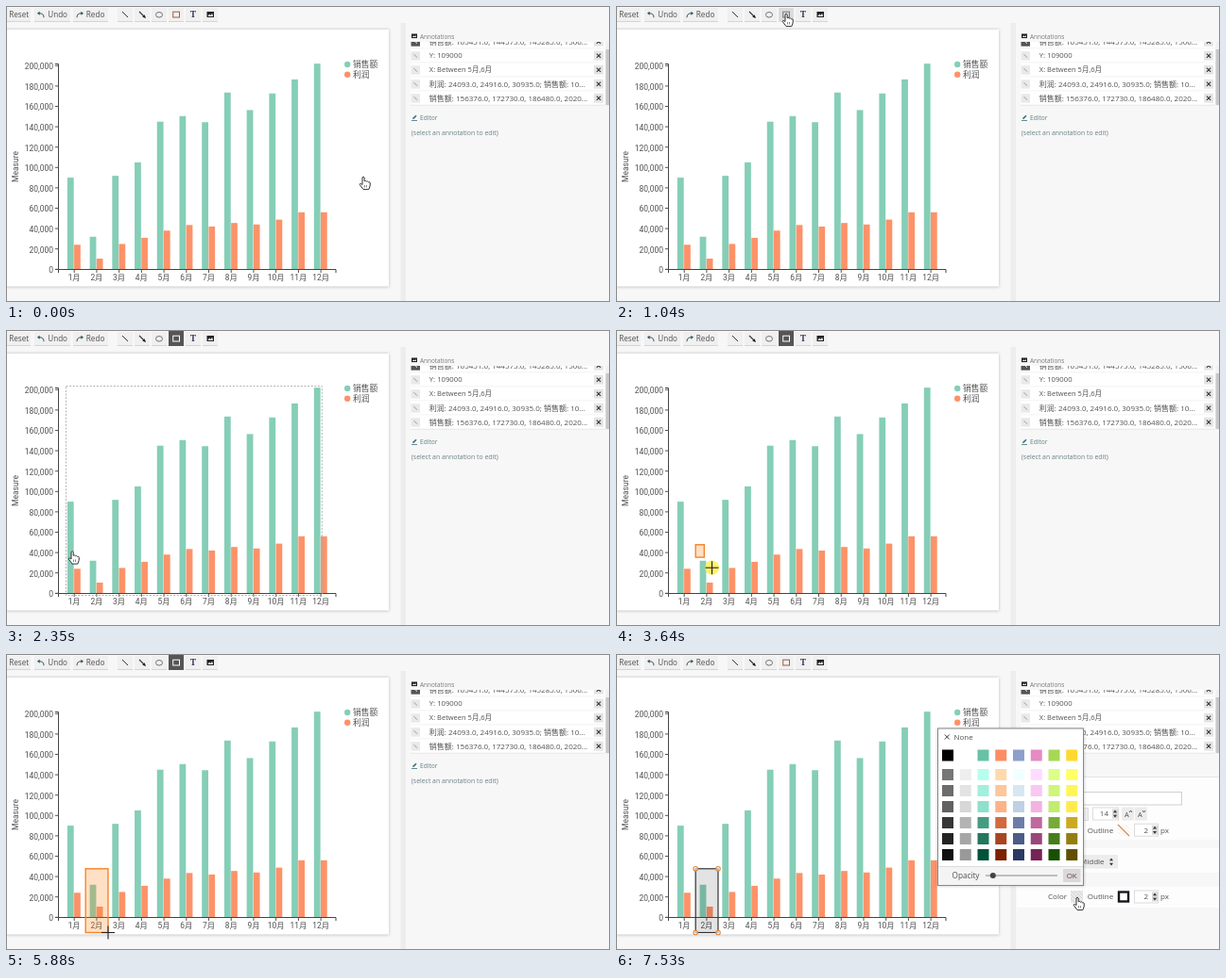
An HTML page with a canvas that plays this animation: 639 px wide and 314 px high, repeating every 8000 ms.

```html
<!DOCTYPE html>
<html lang="en">
<head>
<meta charset="utf-8">
<title>Chart annotation</title>
<style>
html, body { margin: 0; width: 100%; height: 100%; overflow: hidden; background: #f7f7f7; }
canvas { display: block; width: 639px; height: 314px; }
</style>
</head>
<body>
<canvas id="stage"></canvas>
<script>
const W = 639, H = 314, LOOP = 8000;
const canvas = document.getElementById('stage');
const c = canvas.getContext('2d');
const dpr = window.devicePixelRatio || 1;
canvas.width = W * dpr;
canvas.height = H * dpr;

const UI = '"Open Sans", "Noto Sans CJK SC", "Noto Sans CJK", sans-serif';
const CHART = 'Roboto, "Noto Sans CJK SC", "Noto Sans CJK", sans-serif';
const GREEN = '#85ceb7', ORANGE = '#fd9269', INK = '#505050';

const sales = [90, 32, 91.8, 105, 145, 150.5, 144.5, 173.6, 156.4, 172.7, 186.5, 202];
const profit = [24.1, 10.5, 24.9, 30.9, 38, 43.5, 42, 45.5, 44, 48.8, 56, 56];
const BASE = 279.3;
const yOf = v => BASE - v * 1.08;
const xOf = i => 72.2 + 23.72 * i;

const TOOL_ON = 1110, PRESS = 3160, RELEASE = 5380, SELECT = 5950, POPUP = 7400;
const LEFT = 84.2, TOP = 227.8;
// time, x, y, eased
const path = [
  [70, 378, 181], [770, 180, 8, 1], [1110, 180, 8], [1520, 163, 130], [2350, 70, 234.5],
  [2490, 75, 234], [2630, 82, 227], [3160, 82, 227], [3400, 85, 230], [3640, 101.5, 252],
  [3920, 118, 306], [4080, 118, 306], [4480, 106.4, 288.5], [5200, 106.4, 288.5],
  [5410, 108, 295.5], [5950, 108, 295.5], [6580, 439, 249, 1], [6900, 493, 260], [7140, 488, 258]
];

function pointer(t) {
  if (t <= path[0][0]) return path[0].slice(1, 3);
  for (let i = 1; i < path.length; i++) {
    const a = path[i - 1], b = path[i];
    if (t <= b[0]) {
      let k = (t - a[0]) / (b[0] - a[0]);
      if (b[3]) k = k * k * (3 - 2 * k);
      return [a[1] + (b[1] - a[1]) * k, a[2] + (b[2] - a[2]) * k];
    }
  }
  return path[path.length - 1].slice(1, 3);
}

function box(x, y, w, h, fill, stroke, lw = 1) {
  if (fill) { c.fillStyle = fill; c.fillRect(x, y, w, h); }
  if (stroke) { c.strokeStyle = stroke; c.lineWidth = lw; c.strokeRect(x, y, w, h); }
}

function line(color, lw, ...p) {
  c.strokeStyle = color;
  c.lineWidth = lw;
  c.beginPath();
  for (let i = 0; i < p.length; i += 2) c.lineTo(p[i], p[i + 1]);
  c.stroke();
}

function dot(x, y, r, fill, stroke, lw = 1) {
  c.beginPath();
  c.arc(x, y, r, 0, 7);
  if (fill) { c.fillStyle = fill; c.fill(); }
  if (stroke) { c.strokeStyle = stroke; c.lineWidth = lw; c.stroke(); }
}

function text(s, x, y, size, color = INK, align = 'left', font = UI) {
  c.font = size + 'px ' + font;
  c.fillStyle = color;
  c.textAlign = align;
  c.fillText(s, x, y + size * 0.36);
}

function poly(points, fill) {
  c.beginPath();
  for (let i = 0; i < points.length; i += 2) c.lineTo(points[i], points[i + 1]);
  c.closePath();
  c.fillStyle = fill;
  c.fill();
}

function cross(x, y, r, color = '#333', lw = 1.1) {
  line(color, lw, x - r, y - r, x + r, y + r);
  line(color, lw, x + r, y - r, x - r, y + r);
}

function button(x, w, fill = '#f0f0f0') {
  box(x, 2, w, 15, fill);
  line('#d4d4d4', 1, x, 16.5, x + w, 16.5);
}

function picture(x, y, w, h) {
  box(x, y, w, h, '#222');
  poly([x + 1, y + h - 1, x + w * 0.35, y + h * 0.4, x + w * 0.55, y + h * 0.65,
    x + w * 0.75, y + h * 0.3, x + w - 1, y + h - 1], '#f4f4f4');
}

function bend(x, dir) {
  c.save();
  c.translate(x, 9);
  c.scale(dir, 1);
  c.strokeStyle = '#33505e';
  c.lineWidth = 1;
  c.beginPath();
  c.moveTo(3, 3.2);
  c.quadraticCurveTo(3, -1.5, -2, -1.2);
  c.stroke();
  poly([-4, -1.2, -1.4, -3.2, -1.4, 0.8], '#33505e');
  c.restore();
}

function toolbar(active, hover) {
  button(1, 25); text('Reset', 3.2, 9.3, 8.2);
  button(30, 38); bend(37, 1); text('Undo', 44.3, 9.3, 8.1);
  button(71, 37); bend(78, -1); text('Redo', 84.8, 9.3, 8.2);
  for (let i = 0; i < 6; i++) button(118 + 18 * i, 16);
  line('#333', 1, 123, 6, 129, 12);
  line('#333', 1.1, 141, 6, 147, 12);
  poly([148, 13, 144.2, 11.6, 146.6, 9.2], '#222');
  c.beginPath();
  c.ellipse(162, 9.3, 3.5, 2.8, 0, 0, 7);
  c.strokeStyle = '#666';
  c.lineWidth = 0.9;
  c.stroke();
  if (active) box(172, 1, 16, 16, '#555');
  else if (hover) box(172, 2, 16, 15, '#dcdcdc');
  box(176.7, 6.2, 6.8, 5.8, null, active ? '#fff' : hover ? '#777' : '#9a5f42', 1);
  c.font = 'bold 9px "Noto Serif", serif';
  c.fillStyle = '#35355c';
  c.textAlign = 'center';
  c.fillText('T', 198, 12.4);
  picture(212.5, 6, 7.5, 6);
}

function chart() {
  c.save();
  c.shadowColor = 'rgba(0,0,0,.25)';
  c.shadowBlur = 3 * dpr;
  box(0, 25, 405, 272.5, '#fff');
  c.restore();
  sales.forEach((v, i) => {
    const x = xOf(i), p = profit[i];
    box(x - 7.3, yOf(v), 6.8, v * 1.08, GREEN);
    box(x - 0.1, yOf(p), 6.7, p * 1.08, ORANGE);
    line('#555', 1, x, 279.5, x, 283);
    text(i + 1 + '月', x, 288.3, 8.4, INK, 'center', CHART);
  });
  line('#444', 1, 52, 61.5, 55.5, 61.5, 55.5, 279.5, 52, 279.5);
  line('#444', 1, 55.5, 283, 55.5, 279.5, 349, 279.5, 349, 283);
  for (let v = 0; v <= 200; v += 20) {
    const y = yOf(v);
    line('#555', 1, 52, y, 55.5, y);
    text(v ? v + ',000' : '0', 50, y + 0.8, 8.5, INK, 'right', CHART);
  }
  c.save();
  c.translate(10, 170.5);
  c.rotate(-Math.PI / 2);
  text('Measure', 0, 0, 8.5, INK, 'center', CHART);
  c.restore();
  dot(361.2, 62, 3.2, GREEN);
  dot(361.2, 72.7, 3.2, ORANGE);
  text('销售额', 367, 62, 8.8, INK, 'left', CHART);
  text('利润', 367, 72.7, 8.8, INK, 'left', CHART);
}

const rows = [
  ['销售额: 105451.0, 144575.0, 145285.0, 1506...', 8],
  ['Y: 109000', 7.7],
  ['X: Between 5月,6月', 7.5],
  ['利润: 24093.0, 24916.0, 30935.0; 销售额: 10...', 8],
  ['销售额: 156376.0, 172730.0, 186480.0, 2020...', 8]
];

function list() {
  box(417.5, 18, 5.5, 296, '#ededed');
  picture(429, 29.5, 6, 4.6);
  text('Annotations', 438, 32.2, 6.4, '#777');
  c.save();
  c.beginPath();
  c.rect(424, 38, 214, 68);
  c.clip();
  rows.forEach(([s, size], i) => {
    const y = 37.7 + 15 * i;
    box(428, y - 7.5, 205.5, 15, '#fff');
    line('#e6e6e6', 1, 428, y + 7.5, 633.5, y + 7.5);
    box(428.5, y - 4.5, 9.5, 9.5, i ? '#e9e9e9' : '#555');
    line(i ? '#999' : '#fff', 1, 431.5, y - 1.5, 435, y + 2);
    text(s, 447.8, y, size);
    box(622, y - 5, 10, 10, '#e5e5e5');
    cross(627, y, 2.1);
  });
  box(634.5, 38, 3.5, 68, '#f1f1f1');
  box(634.5, 46, 3.5, 59, '#c8c8c8');
  c.restore();
  line('#3f6f7a', 1.6, 430.5, 119.6, 434, 116.2);
  line('#3f6f7a', 0.8, 429, 121.5, 435, 121.5);
  text('Editor', 438, 118.5, 6.6, '#5d7f88');
}

function spinner(x, y, w, value) {
  box(x + 0.5, y - 6.5, w, 13, '#fff', '#dcdcdc');
  text(value, x + w - 10, y, 8, INK, 'right');
  box(x + w - 6, y - 5, 6, 10, '#d9d9d9');
  arrows(x + w - 3, y);
}

function arrows(x, y) {
  poly([x - 2, y - 1.2, x, y - 4, x + 2, y - 1.2], '#333');
  poly([x - 2, y + 1.2, x, y + 4, x + 2, y + 1.2], '#333');
}

function outline(y) {
  text('Outline', 498.8, y, 8);
  spinner(548, y, 25, '2');
  text('px', 576, y, 8);
}

function hatch(x, y, color, back) {
  box(x, y, 13, 13, back);
  c.save();
  c.beginPath();
  c.rect(x, y, 13, 13);
  c.clip();
  for (let d = -8; d < 13; d += 4) line(color, 1, x + d, y, x + d + 13, y + 13);
  c.restore();
}

function editor() {
  box(424, 131, 214, 66, '#fdfdfd');
  line('#e4e4e4', 1, 424, 130.5, 638, 130.5);
  box(424, 206, 214, 26, '#fdfdfd');
  box(424, 247, 214, 22, '#fdfdfd');
  text('Text', 430, 153, 8);
  box(452.5, 146.5, 146, 13.5, '#fff', '#d0d0d0');
  box(430.5, 163.5, 69, 13, '#eee', '#ddd');
  text('Sans', 434, 169.5, 8);
  spinner(504, 169.5, 27, '14');
  [535, 549].forEach((x, i) => {
    box(x, 162.5, 13, 14, '#ececec');
    text('A', x + 3, 170, 7.5);
    line('#333', 0.8, x + 8, i ? 166 : 168, x + 9.5, i ? 168 : 166, x + 11, i ? 166 : 168);
  });
  text('Color', 457, 186.7, 8);
  box(481, 180.5, 13, 13, '#333', '#ddd');
  outline(186.7);
  hatch(530.5, 180.5, '#f6ebe2', '#fff');
  line('#d08a50', 1.2, 531, 181, 543, 193);
  text('Anchor', 457, 220.5, 8);
  box(488, 213, 43, 14.5, '#ececec');
  text('Middle', 491, 220.5, 8);
  arrows(524, 220.5);
  text('Color', 457, 257.5, 8);
  hatch(481, 251, '#d4d4d4', '#e9e9e9');
  outline(257.5);
  box(532, 252.5, 10, 10, '#fff', '#1c1420', 2.4);
}

// light, base, dark shades, and a top swatch if not the base
const palette = [
  ['777777', '4a4a4a', '101010', '000000'], ['eeeeee', 'c0c0c0', '999999', 'ffffff'],
  ['b4fff0', '66c2a5', '00523a'], ['ffd9ac', 'fc8d62', '7f2000'],
  ['f0ffff', '8da0cb', '2a3a63'], ['ffdcff', 'e78ac3', '762358'],
  ['dcff88', 'a6d854', '185000'], ['ffff66', 'ffd92f', '605000']
];

function mix(a, b, k) {
  const part = (h, i) => parseInt(h.substr(i, 2), 16);
  return 'rgb(' + [0, 2, 4].map(i => Math.round(part(a, i) + (part(b, i) - part(a, i)) * k)) + ')';
}

function popup() {
  c.save();
  c.shadowColor = 'rgba(0,0,0,.25)';
  c.shadowBlur = 3 * dpr;
  box(340, 79, 155, 167, '#fff');
  c.restore();
  box(341, 225, 153, 20, '#f4f4f4');
  line('#ddd', 1, 341, 225.5, 494, 225.5);
  box(340.5, 79, 154, 166.5, null, '#888');
  cross(350.3, 88, 2.5, '#333', 1);
  text('None', 357.5, 88, 8);
  palette.forEach(([light, base, dark, top], i) => {
    const x = 345 + 18.75 * i;
    box(x, 101.5, 12, 12, '#' + (top || base));
    for (let k = 0; k < 6; k++) {
      box(x, 122 + 17 * k, 12, 12, k < 3 ? mix(light, base, k / 4) : mix(base, dark, (k - 2) / 3));
    }
  });
  text('Opacity', 355.5, 235, 8.2);
  line('#888', 1, 391, 235, 467, 235);
  dot(398.8, 235, 3, '#444');
  box(473, 228, 18.5, 14, '#ddd6da');
  text('OK', 482.2, 235, 8, INK, 'center');
}

function dashed(x, y, w, h) {
  c.setLineDash([2, 1.6]);
  box(x, y, w, h, null, '#aaa', 0.9);
  c.setLineDash([]);
}

function mark(t) {
  const [x, y] = pointer(Math.min(t - 120, SELECT));
  const w = x - LEFT, h = y - TOP;
  if (t < PRESS || w < 0.5 || h < 0.5) return;
  if (t < SELECT) {
    box(LEFT, TOP, w, h, 'rgba(255,127,14,.24)', '#f5842a', 1.4);
    return;
  }
  box(LEFT, TOP, w, h, 'rgba(0,0,0,.11)', '#333', 1.2);
  for (const px of [LEFT, x]) for (const py of [TOP, y]) dot(px, py, 2.3, 'rgba(255,255,255,.6)', '#e08a40', 1.1);
}

function hand(x, y) {
  c.save();
  c.translate(x, y);
  c.beginPath();
  c.moveTo(-1, 8.5);
  c.lineTo(-1, 1);
  c.quadraticCurveTo(0.1, -0.8, 1.2, 1);
  c.lineTo(1.2, 4.8);
  c.quadraticCurveTo(2.4, 3.8, 3.4, 5.2);
  c.quadraticCurveTo(4.6, 4.4, 5.4, 5.8);
  c.quadraticCurveTo(7, 5.2, 7.3, 7);
  c.lineTo(7.1, 10);
  c.lineTo(5.8, 13.6);
  c.lineTo(0, 13.6);
  c.lineTo(-3.8, 8.4);
  c.quadraticCurveTo(-3.8, 6.4, -1, 8.5);
  c.closePath();
  c.fillStyle = '#fff';
  c.fill();
  c.strokeStyle = '#333';
  c.lineWidth = 1;
  c.stroke();
  line('#555', 0.7, 1.5, 9, 1.5, 11.5);
  line('#555', 0.7, 3.5, 9, 3.5, 11.5);
  c.restore();
}

function draw(t) {
  const [x, y] = pointer(t);
  const tool = t >= TOOL_ON && t < SELECT;
  const bar = t < PRESS ? sales.findIndex((v, i) =>
    x > xOf(i) - 7.3 && x < xOf(i) - 0.5 && y > yOf(v) && y < BASE) : -1;

  c.setTransform(dpr, 0, 0, dpr, 0, 0);
  box(0, 0, W, H, '#f7f7f7');
  toolbar(tool, x > 172 && x < 188 && y < 18);
  chart();
  if (bar >= 0) {
    if (tool) dashed(63.5, 59.5, 270.8, 222);
    else dashed(xOf(bar) - 9, yOf(sales[bar]) - 1.8, 10.3, sales[bar] * 1.08 + 3.4);
  }
  mark(t);
  list();
  if (t < SELECT) text('(select an annotation to edit)', 428.8, 135, 6.9, '#6b7f85');
  else editor();
  if (t >= POPUP) popup();
  box(0.5, 0.5, W - 1, H - 1, null, '#8a8a8a');

  if (tool && y > 25 && bar < 0) {
    if (t >= PRESS && t < RELEASE) dot(x, y, 7.6, 'rgba(255,236,50,.7)');
    line('#222', 1.1, x - 7, y, x + 7, y);
    line('#222', 1.1, x, y - 7, x, y + 7);
  } else hand(x, y);
}

const start = performance.now();
function tick() {
  draw((performance.now() - start) % LOOP);
  requestAnimationFrame(tick);
}
tick();
</script>
</body>
</html>
```
